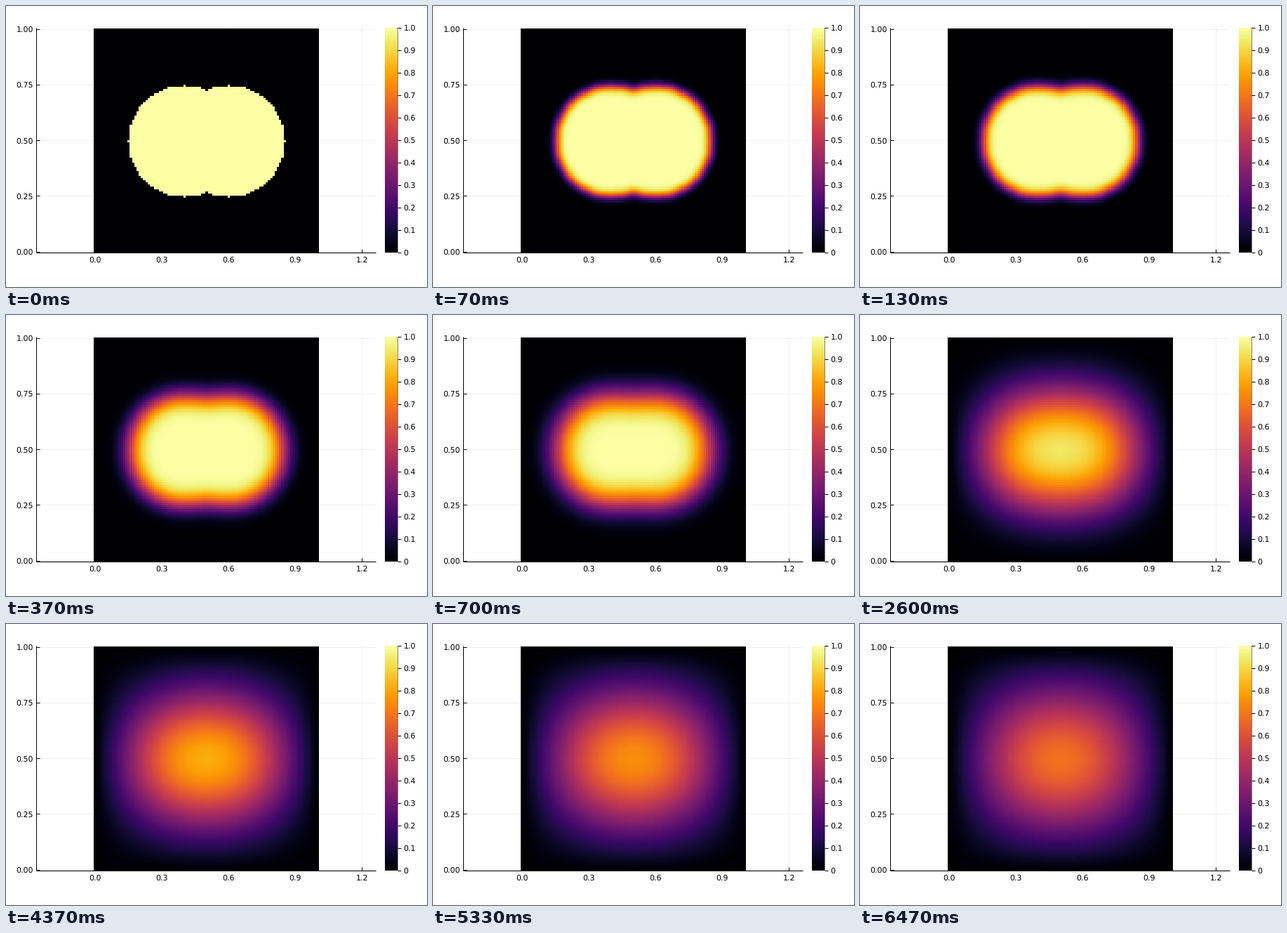
Recreate the animation shown at these times as a matplotlib script. Size 600 by 400 pixels, loop 6.71 s.

```python
import numpy as np
import matplotlib.pyplot as plt
from matplotlib.animation import FuncAnimation

plt.rcParams.update({
    "font.family": "DejaVu Sans",
    "text.hinting": "none",
    "text.hinting_factor": 1,
})

WIDTH, HEIGHT, DPI = 600, 400, 100
PX = 72 / DPI  # one pixel in points
INTERVAL, FRAMES = 22, 305
STEP_MS = 100 / 3  # simulation runs at 30 steps per second
STEP_DIFFUSION = 1e-4
N = 100  # grid intervals per side

# Pixel edges; lines at whole numbers snap to the pixel starting there.
AXIS_LEFT, AXIS_RIGHT, AXIS_TOP, AXIS_BOTTOM = 43, 527, 31, 351
MAP_LEFT, MAP_RIGHT, MAP_TOP, MAP_BOTTOM = 125, 446, 32, 352
BAR_LEFT, BAR_RIGHT, BAR_TOP, BAR_BOTTOM = 540, 558, 31, 351


def to_x(x):
    return 126.9 + 317 * x


def to_y(y):
    return 349.6 - 317 * y


# Starting state: two overlapping hot discs, edges held at zero.
k = np.arange(N + 1)
gx, gy = np.meshgrid(k, k)
start = ((abs(gx - 50) - 10) ** 2 + (gy - 50) ** 2 <= 625).astype(float)

# Heat equation solved in the discrete sine basis.
basis = np.sin(np.pi * np.outer(k, k) / N)
coeffs = basis @ start @ basis * (2 / N) ** 2
eigen = (2 * N * np.sin(np.pi * k / (2 * N))) ** 2
rate = eigen[:, None] + eigen[None, :]


def heat(step):
    if step == 0:
        return start
    decay = np.exp(-rate * STEP_DIFFUSION * step)
    return np.clip(basis @ (coeffs * decay) @ basis, 0, 1)


def cell_of_pixel(size):
    return np.arange(size) * (N + 1) // size


rows = cell_of_pixel(MAP_BOTTOM - MAP_TOP)
cols = cell_of_pixel(MAP_RIGHT - MAP_LEFT)


def heat_pixels(step):
    return heat(step)[np.ix_(rows, cols)]


fig = plt.figure(figsize=(WIDTH / DPI, HEIGHT / DPI), dpi=DPI, facecolor="white")
ax = fig.add_axes([0, 0, 1, 1])
ax.axis("off")


def line(xs, ys, **style):
    ax.plot(xs, ys, color="black", lw=PX, solid_capstyle="butt", **style)


def label(x, y, text, ha):
    ax.text(x, y, text, ha=ha, va="center_baseline", fontsize=10.67 * PX, zorder=5)


def image(data, left, right, top, bottom):
    return ax.imshow(data, cmap="inferno", vmin=0, vmax=1, origin="upper",
                     aspect="auto", extent=(left, right, bottom, top),
                     interpolation="nearest", zorder=2)


field = image(heat_pixels(0), MAP_LEFT, MAP_RIGHT, MAP_TOP, MAP_BOTTOM)
image(np.linspace(1, 0, 256)[:, None], BAR_LEFT, BAR_RIGHT, BAR_TOP, BAR_BOTTOM)

for value in np.arange(5) / 4:
    y = to_y(value)
    line([AXIS_LEFT, AXIS_RIGHT], [y, y], alpha=0.06, zorder=1)
    line([AXIS_LEFT, AXIS_LEFT + 5], [y, y], zorder=4)
    label(39.2, y + 0.3, f"{value:.2f}", "right")

for value in np.arange(5) * 0.3:
    x = to_x(value)
    line([x, x], [AXIS_TOP, AXIS_BOTTOM], alpha=0.06, zorder=1)
    line([x, x], [AXIS_BOTTOM, AXIS_BOTTOM - 5], zorder=4)
    label(x + 0.2, 361, f"{value:.1f}", "center")

for i in range(11):
    y = BAR_BOTTOM - 32 * i
    line([BAR_RIGHT, BAR_RIGHT + 5], [y, y], zorder=4)
    label(566.3, y, f"{i / 10:.1f}" if i else "0", "left")

line([AXIS_LEFT, AXIS_LEFT], [AXIS_TOP, AXIS_BOTTOM], zorder=4)
line([AXIS_LEFT, AXIS_RIGHT], [AXIS_BOTTOM, AXIS_BOTTOM], zorder=4)
line([BAR_RIGHT, BAR_RIGHT], [BAR_TOP, BAR_BOTTOM], linestyle=(0, (1, 1)), zorder=3)

ax.set_xlim(0, WIDTH)
ax.set_ylim(HEIGHT, 0)


def update(frame):
    step = int((frame * INTERVAL + 16) / STEP_MS)
    field.set_data(heat_pixels(step))
    return [field]


animation = FuncAnimation(fig, update, frames=FRAMES, interval=INTERVAL,
                          repeat=True, repeat_delay=0, blit=False)
plt.show()
```
